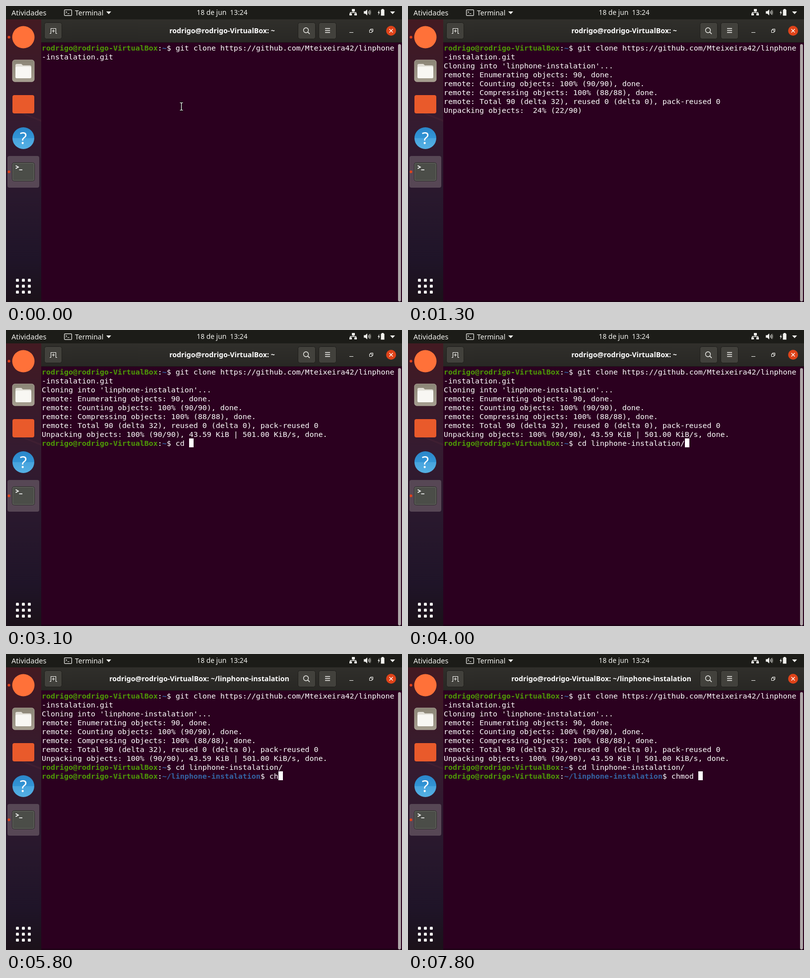
Animation, 798 px wide and 598 px high, one loop 8 s. Source, as an HTML page:

```html
<!DOCTYPE html>
<html lang="pt">
<head>
<meta charset="utf-8">
<title>Terminal</title>
<style>
  html, body { margin: 0; width: 100%; height: 100%; overflow: hidden; background: #2b001f; }
  #stage { position: absolute; left: 0; top: 0; width: 798px; height: 598px; overflow: hidden; }
  svg { position: absolute; left: 0; top: 0; }
  svg text { font-family: "Noto Sans", "Open Sans", sans-serif; fill: #f2f2ee; }
  #title { font-weight: 700; font-size: 14.2px; fill: #fff; text-anchor: middle; }
  #term {
    position: absolute; left: 72px; top: 76px; margin: 0; color: #fff;
    font: 14.95px/18px "DejaVu Sans Mono", monospace; white-space: pre;
  }
  #term div { height: 18px; }
  #term b { color: #4e9a06; }
  #term b.path { color: #3465a4; }
  #caret { position: absolute; width: 9px; height: 18px; background: #fff; }
</style>
</head>
<body>
<div id="stage">
<svg width="798" height="598" viewBox="0 0 798 598">
  <defs>
    <linearGradient id="dock" x1="0" y1="0" x2="0" y2="1">
      <stop offset="0" stop-color="#431a22"/>
      <stop offset=".2" stop-color="#3a1a29"/>
      <stop offset=".37" stop-color="#351b30"/>
      <stop offset=".62" stop-color="#29182d"/>
      <stop offset=".85" stop-color="#1f1428"/>
      <stop offset="1" stop-color="#1b1119"/>
    </linearGradient>
    <linearGradient id="bar" x1="0" y1="0" x2="0" y2="1">
      <stop offset="0" stop-color="#302f2b"/>
      <stop offset="1" stop-color="#282724"/>
    </linearGradient>
    <linearGradient id="files" x1="0" y1="0" x2="0" y2="1">
      <stop offset="0" stop-color="#8b8576"/>
      <stop offset="1" stop-color="#a59e8f"/>
    </linearGradient>
    <linearGradient id="help" x1="0" y1="0" x2="0" y2="1">
      <stop offset="0" stop-color="#2b86c9"/>
      <stop offset=".5" stop-color="#3295d6"/>
      <stop offset=".5" stop-color="#47a4de"/>
      <stop offset="1" stop-color="#55b0e4"/>
    </linearGradient>
  </defs>

  <!-- window -->
  <rect x="71" y="27" width="727" height="571" fill="#2b001f"/>
  <rect x="71" y="27" width="727" height="47" fill="url(#bar)"/>
  <path d="M71 73.5H798" stroke="#1b1a18"/>
  <path d="M71 596.5H798" stroke="#1f0217" stroke-width="3"/>
  <rect x="790" y="77" width="6" height="520" rx="3" fill="#aea6a8"/>
  <g fill="#42413c" stroke="#1f1e1b">
    <rect x="77.5" y="33.500" width="35" height="33" rx="4"/>
    <rect x="588.500" y="33.500" width="35" height="33" rx="4"/>
    <rect x="630.500" y="33.500" width="35" height="33" rx="4"/>
  </g>
  <g fill="none" stroke="#f2f2ee">
    <path d="M88 55.500H90.500V45.500H100.500V55.500H103M95.500 47.500V53.500M92.500 50.500H98.500" stroke-width="1.1"/>
    <circle cx="604.500" cy="49" r="5" stroke-width="1.3"/>
    <path d="M608.200 52.700L612 56.500" stroke-width="1.6"/>
    <path d="M643 45.500H653M643 49.500H653M643 53.500H653" stroke-width="1.4"/>
    <path d="M692 53.500H700"/>
    <path d="M732.500 48.500H737.500V53.500H732.500ZM734.500 48V46.500H739.500V51.500H738"/>
  </g>
  <circle cx="776" cy="50" r="10" fill="#df4319"/>
  <path d="M772.500 46.500L779.500 53.500M779.500 46.500L772.500 53.500" stroke="#fff" stroke-width="1.4"/>
  <text id="title" y="55"></text>

  <!-- dock -->
  <rect y="27" width="71" height="571" fill="url(#dock)"/>
  <path d="M30 217L71 234V230L38 217Z" fill="#4a2435" opacity=".45"/>
  <rect x="3" y="303" width="64" height="64" rx="4" fill="#574755"/>
  <g fill="#e2421b"><circle cx="6" cy="63" r="2.700"/><circle cx="6" cy="335" r="2.700"/></g>
  <circle cx="35" cy="63" r="22.500" fill="#ff7139"/>
  <rect x="13" y="109" width="44" height="44" rx="5" fill="url(#files)" stroke="#bbb5a7" stroke-width=".8"/>
  <path d="M19 120Q19 117 22 117H31L34 120H48Q51 120 51 123V143Q51 146 48 146H22Q19 146 19 143Z" fill="#e1ded6"/>
  <rect x="19" y="122.500" width="32" height="23.500" rx="3" fill="#f8f7f3"/>
  <rect x="13" y="180" width="44" height="37" rx="4" fill="#e95a2b"/>
  <circle cx="35" cy="267" r="22" fill="url(#help)"/>
  <text x="35" y="279" font-size="33" text-anchor="middle" style="fill:#fff">?</text>
  <rect x="12.500" y="316.500" width="45" height="37" rx="4" fill="#4b4d48" stroke="#242622"/>
  <rect x="13.500" y="317.500" width="43" height="35" rx="3" fill="none" stroke="#6b6d67"/>
  <path d="M19.500 322.500L25 325.500L19.500 328.500M26.500 331H33" fill="none" stroke="#fff" stroke-width="1.6"/>
  <g id="apps" fill="#f4f3f1"></g>

  <!-- panel -->
  <rect width="798" height="27" fill="#1c1c18"/>
  <text x="11" y="18.500" font-size="14.500">Atividades</text>
  <text x="139" y="18.500" font-size="14">Terminal</text>
  <text x="435.500" y="18" font-size="13.800" text-anchor="middle" xml:space="preserve">18 de jun  13:24</text>
  <rect x="117.600" y="7.600" width="14.800" height="11.800" rx="1.500" fill="none" stroke="#f2f2ee" stroke-width="1.200"/>
  <path d="M120 10.500L123 12.500L120 14.500M124 15.500H127.500" fill="none" stroke="#f2f2ee"/>
  <g fill="#f2f2ee">
    <path d="M202 11H212L207 16.500ZM774 11H784L779 16.500Z"/>
    <path d="M697 6H703V11H700.600V12.500H706V15H707V19H702V15H704.500V14H694.500V15H697V19H692V15H693V12.500H699.400V11H697Z"/>
    <path d="M721 10.500H724L728 7V19L724 15.500H721Z"/>
    <path d="M752.500 8L749 14H751L750 19L753.500 12.500H751.500Z"/>
    <path d="M757 6H761V7.500H757ZM755.500 7.500H762.500V19.500H755.500Z"/>
  </g>
  <path d="M730 10.500Q731.800 13 730 15.500M732 8.500Q735 13 732 17.500" fill="none" stroke="#f2f2ee" stroke-width="1.200"/>
  <path d="M734.300 7.500Q737 13 734.300 18.500" fill="none" stroke="#77776f"/>
</svg>
<div id="term"></div>
<div id="caret"></div>
<svg id="mouse" width="798" height="598">
  <path id="beam" d="M350.500 195.500H352.500L353.500 196.500L354.500 195.500H356.500M353.500 196V210M350.500 210.500H352.500L353.500 209.500L354.500 210.500H356.500" fill="none" stroke="#111" stroke-width="3"/>
  <use href="#beam" style="display:none"/>
  <path d="M350.500 195.500H352.500L353.500 196.500L354.500 195.500H356.500M353.500 196V210M350.500 210.500H352.500L353.500 209.500L354.500 210.500H356.500" fill="none" stroke="#fff" stroke-width="1.200"/>
</svg>
</div>
<script>
const $ = id => document.getElementById(id);
const LOOP = 8000;
const USER = 'rodrigo@rodrigo-VirtualBox';
const DIR = 'linphone-instalation';

const prompt = path => `<b>${USER}</b>:<b class="path">${path}</b>$ `;
const home = prompt('~');
const inside = prompt('~/' + DIR);

const command = [home + 'git clone https://github.com/Mteixeira42/linphone', '-instalation.git'];
const cloning = [...command, `Cloning into '${DIR}'...`];
const remote = [
  ...cloning,
  'remote: Enumerating objects: 90, done.',
  'remote: Counting objects: 100% (90/90), done.',
  'remote: Compressing objects: 100% (88/88), done.',
  'remote: Total 90 (delta 32), reused 0 (delta 0), pack-reused 0'
];
const unpacking = [...remote, 'Unpacking objects:  24% (22/90)'];
const cloned = [...remote, 'Unpacking objects: 100% (90/90), 43.59 KiB | 501.00 KiB/s, done.'];
const cd = typed => [...cloned, home + typed];
const chmod = typed => [...cd(`cd ${DIR}/`), inside + typed];

// start time, lines, caret [column, row] or nothing
const steps = [
  [0, command],
  [100, command, [16, 1]],
  [600, cloning, [0, 3]],
  [1100, cloning],
  [1300, unpacking],
  [1400, cd('')],
  [1700, cd(''), [30, 8]],
  [2400, cd('')],
  [2800, cd('c'), [31, 8]],
  [2900, cd('cd'), [32, 8]],
  [3100, cd('cd '), [33, 8]],
  [3700, cd('cd l'), [34, 8]],
  [3900, cd('cd li'), [35, 8]],
  [4000, cd(`cd ${DIR}/`), [54, 8]],
  [4700, chmod(''), [51, 9]],
  [5200, chmod('')],
  [5600, chmod('c'), [52, 9]],
  [5800, chmod('ch'), [53, 9]],
  [6300, chmod('chm'), [54, 9]],
  [6500, chmod('chmo'), [55, 9]],
  [6600, chmod('chmod '), [57, 9]],
  [7300, chmod('chmod ')],
  [7800, chmod('chmod '), [57, 9]]
];

for (let i = 0; i < 9; i++) {
  const x = 20 + i % 3 * 12, y = 551 + Math.floor(i / 3) * 12;
  $('apps').innerHTML += `<rect x="${x}" y="${y}" width="6" height="6" rx="1.5"/>`;
}

let shown = null;

function draw(t) {
  const step = steps.findLast(s => s[0] <= t);
  const moved = t >= 4600;
  $('title').textContent = `${USER}: ~${moved ? '/' + DIR : ''}`;
  $('title').setAttribute('x', moved ? 389.5 : 435.5);
  $('mouse').style.display = t < 600 ? '' : 'none';
  if (step === shown) return;
  shown = step;
  const [, lines, caret] = step;
  $('term').innerHTML = lines.map(line => `<div>${line}</div>`).join('');
  $('caret').style.display = caret ? '' : 'none';
  if (caret) {
    $('caret').style.left = 72 + caret[0] * 9 + 'px';
    $('caret').style.top = 75 + caret[1] * 18 + 'px';
  }
}

const start = performance.now();
function tick() {
  draw((performance.now() - start) % LOOP);
  requestAnimationFrame(tick);
}
draw(0);
requestAnimationFrame(tick);
</script>
</body>
</html>
```
